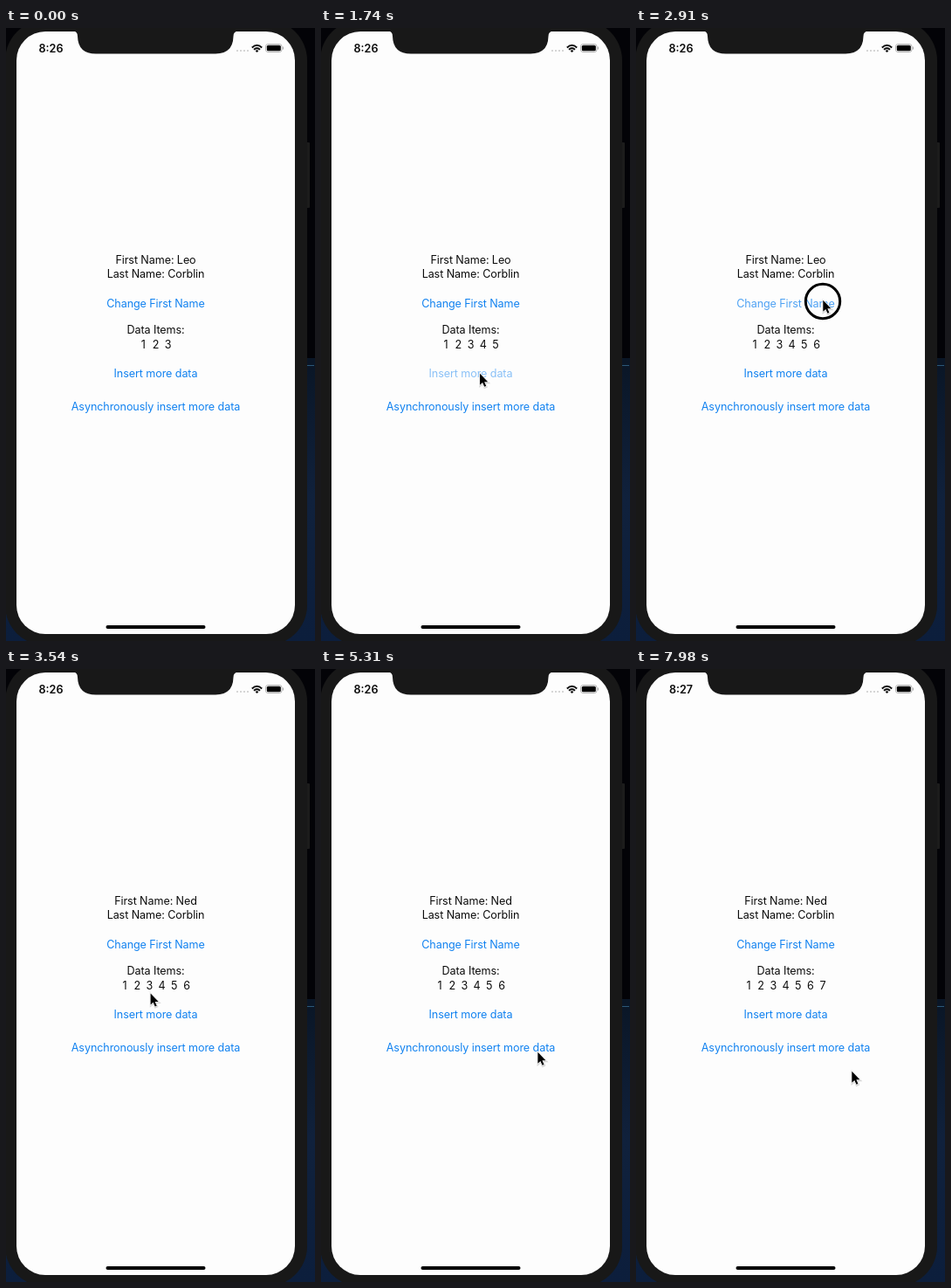
Recreate the animation shown at these times as an HTML page. Size 354 px wide and 702 px high, loop 8 s.

```html
<!DOCTYPE html>
<html lang="en">
<head>
<meta charset="utf-8">
<title>Data demo</title>
<style>
  html, body { margin: 0; width: 100%; height: 100%; overflow: hidden; background: #000; }
  svg { display: block; width: 354px; height: 702px; }
  text { font: 12.6px Inter, "Open Sans", sans-serif; letter-spacing: -.1px; text-anchor: middle; fill: #0c0c0c; }
  .button { fill: #1182f0; }
  #clock { font-weight: 600; letter-spacing: 0; }
</style>
</head>
<body>
<svg viewBox="0 0 354 702">
  <defs>
    <linearGradient id="water" x2="0" y2="1">
      <stop stop-color="#0a1626"/>
      <stop offset=".5" stop-color="#10213c"/>
      <stop offset="1" stop-color="#0c1e3c"/>
    </linearGradient>
    <path id="arrow" d="M0 0V15L3.5 11.8L6 17.5L8.3 16.5L5.9 11H10.6Z"/>
  </defs>

  <!-- Desktop behind the phone -->
  <rect width="354" height="702" fill="#030307"/>
  <rect y="378" width="354" height="324" fill="url(#water)"/>
  <path d="M345 386.5h8" stroke="#2c5878"/>

  <!-- Phone -->
  <rect x="343" y="131" width="5" height="75" rx="1" fill="#1c1c1c"/>
  <rect x="-1" y="-9" width="346" height="716" rx="46" fill="#181818"/>
  <rect x="12" y="4" width="319" height="690" rx="33" fill="#fdfdfd"/>
  <path d="M77 3.5Q82 4 82 9.5Q82.5 29.5 103 29.5H240Q260 29.5 260.5 9.5Q260.5 4 266 3.5Z" fill="#181818"/>
  <rect x="114.5" y="684" width="114" height="4" rx="2"/>

  <!-- Status bar -->
  <text id="clock" x="51.5" y="27.5"></text>
  <path d="M265 26h14" stroke="#c8c8c8" stroke-width="2" stroke-linecap="round" stroke-dasharray="0 4"/>
  <g fill="none" stroke="#111" stroke-width="2">
    <path d="M281.8 22.4Q287.5 17.2 293.2 22.4"/>
    <path d="M284 24.7Q287.5 21.6 291 24.7"/>
  </g>
  <path d="M285.6 26L287.5 28L289.4 26Q287.5 24.6 285.6 26Z"/>
  <rect x="297.5" y="18.5" width="18.5" height="9" rx="2.6" fill="none" stroke="#a4a4a4" stroke-width=".8"/>
  <rect x="298.8" y="19.8" width="16" height="6.4" rx="1.5"/>
  <path d="M317.4 21.5v3" stroke="#a4a4a4"/>

  <!-- App -->
  <text id="first" x="171.5" y="269.5"></text>
  <text x="171.5" y="286">Last Name: Corblin</text>
  <text id="change" class="button" x="171.5" y="319.5">Change First Name</text>
  <text x="171.5" y="350">Data Items:</text>
  <g id="items"></g>
  <text id="insert" class="button" x="171.5" y="400.3">Insert more data</text>
  <text id="async" class="button" x="171.5" y="438.3">Asynchronously insert more data</text>

  <!-- Pointer -->
  <g id="pointer">
    <circle id="ring" cy="2" r="19.7" fill="none" stroke="#000" stroke-width="3"/>
    <g transform="translate(.3 .8) scale(.86)">
      <use href="#arrow" x=".4" y="1" fill="none" stroke="#c4c4c4" stroke-width="2.6" opacity=".7"/>
      <use href="#arrow" stroke="#fdfdfd" stroke-width="1.4" paint-order="stroke"/>
    </g>
  </g>
</svg>

<script>
const LOOP = 8000;
const $ = id => document.getElementById(id);

// Pointer stops: time, x, y
const stops = [
  [650, 225, 520], [1050, 184, 408], [1250, 182, 395], [2250, 181.5, 395],
  [2780, 214, 311], [3250, 214, 311], [3850, 112, 436], [4200, 117, 436],
  [4500, 132, 436], [5150, 248, 438], [6100, 249, 438], [6650, 247, 460]
];

// Taps: button, press time, release time
const taps = [
  ["insert", 1290, 1380], ["insert", 1530, 1630], ["insert", 1930, 2030],
  ["change", 2870, 2980], ["async", 5480, 5590]
];
const insertTimes = [1385, 1635, 2035, 7590];

const clamp = v => Math.min(1, Math.max(0, v));
const ease = v => v * v * (3 - 2 * v);

function pointerAt(t) {
  const next = stops.findIndex(s => s[0] > t);
  if (next < 0) return stops.at(-1).slice(1);
  const [t0, x0, y0] = stops[Math.max(0, next - 1)];
  const [t1, x1, y1] = stops[next];
  const k = ease(clamp((t - t0) / (t1 - t0)));
  return [x0 + (x1 - x0) * k, y0 + (y1 - y0) * k];
}

// Buttons dim while pressed and recover after release
function buttonOpacity(id, t) {
  let opacity = 1;
  for (const [button, down, up] of taps) {
    if (button !== id || t < down) continue;
    opacity = t < up ? 1 - .7 * clamp((t - down) / 110)
                     : .3 + .7 * ease(clamp((t - up) / 330));
  }
  return opacity;
}

function setText(node, value) {
  if (node.textContent !== value) node.textContent = value;
}

const digits = Array.from({ length: 7 }, (_, i) => {
  const digit = document.createElementNS("http://www.w3.org/2000/svg", "text");
  digit.textContent = i + 1;
  digit.setAttribute("y", 367);
  return $("items").appendChild(digit);
});

function render(t) {
  setText($("clock"), t < 6700 ? "8:26" : "8:27");
  setText($("first"), "First Name: " + (t < 2985 ? "Leo" : "Ned"));

  const count = 3 + insertTimes.filter(time => t >= time).length;
  digits.forEach((digit, i) => {
    digit.setAttribute("x", 171.5 + (i - (count - 1) / 2) * 14.2);
    digit.style.display = i < count ? "" : "none";
  });

  for (const id of ["change", "insert", "async"]) $(id).style.opacity = buttonOpacity(id, t);

  $("pointer").style.display = t < stops[0][0] ? "none" : "";
  $("pointer").setAttribute("transform", `translate(${pointerAt(t)})`);
  $("ring").style.display = taps.some(([, down, up]) => t >= down && t < up) ? "" : "none";
}

const start = performance.now();
function frame() {
  render((performance.now() - start) % LOOP);
  requestAnimationFrame(frame);
}
frame();
</script>
</body>
</html>
```
